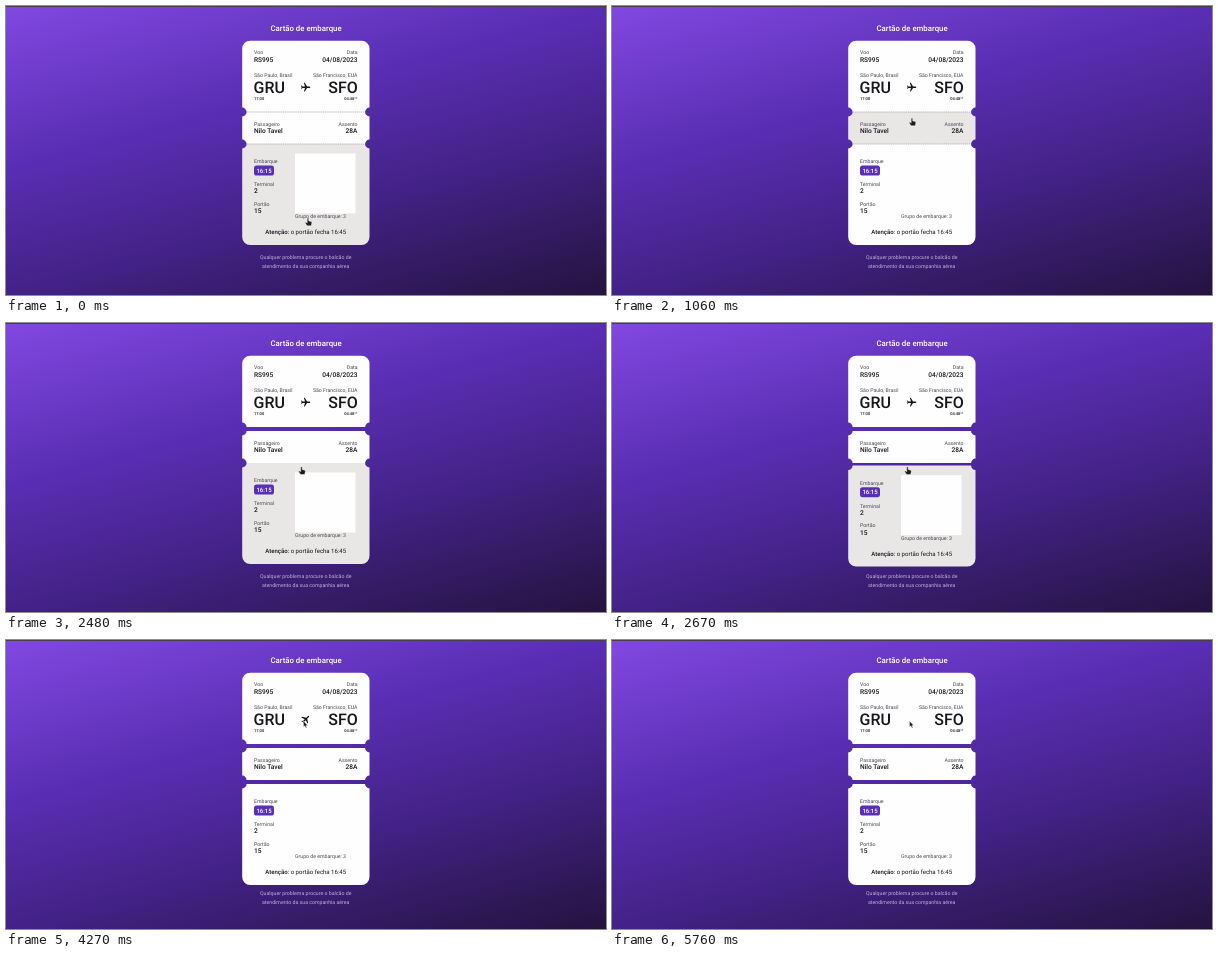
These frames come from a looping animation (600x289 px, 7000 ms). An HTML page:

```html
<!DOCTYPE html>
<html lang="pt-BR">
<head>
<meta charset="utf-8">
<title>Cartão de embarque</title>
<style>
  html, body { margin: 0; width: 100%; height: 100%; overflow: hidden; }
  svg {
    display: block; width: 100%; height: 100%;
    background: linear-gradient(165deg, #8148e0 0%, #5a2eb4 36%, #432287 64%, #25133f 100%);
    font-family: Roboto, Inter, sans-serif;
    text-rendering: geometricPrecision;
  }
  text { fill: #18161c; }
  .label { font-size: 5.2px; fill: #4b4850; }
  .value { font-size: 6.6px; font-weight: 500; }
  .code { font-size: 16px; font-weight: 500; }
  .time { font-size: 4px; font-weight: 500; }
  .strong { font-weight: 500; }
  .mid { text-anchor: middle; }
  .end { text-anchor: end; }
  .title { font-size: 7.8px; font-weight: 500; fill: #fff; }
  .note { font-size: 5.22px; fill: #c0b0dc; }
  .dash { stroke: #8d8a92; stroke-width: .6; stroke-dasharray: 1.2 .7; }
  .cursor { stroke: #fff; stroke-width: .4; fill: #1d1b20; }
</style>
</head>
<body>
<svg viewBox="0 0 600 289">
  <defs>
    <clipPath id="ticketTop"><rect x="236" y="32.5" width="128" height="72"/></clipPath>
  </defs>
  <rect width="600" height="1" fill="#45414a"/>
  <text id="title" class="title mid" x="300" y="25">Cartão de embarque</text>

  <g id="flight">
    <path class="panel"/>
    <text class="label" x="248" y="48.3">Voo</text>
    <text class="value" x="248" y="55.8">RS995</text>
    <text class="label end" x="351.5" y="48.3">Data</text>
    <text class="value end" x="351.5" y="55.8">04/08/2023</text>
    <text class="label" x="248" y="70.9">São Paulo, Brasil</text>
    <text class="label end" x="351.5" y="70.9">São Francisco, EUA</text>
    <text class="code" x="247.5" y="87.1">GRU</text>
    <text class="code end" x="351.8" y="86.7">SFO</text>
    <text class="time" x="248" y="94.4">17:00</text>
    <text class="time end" x="351.5" y="94.4">04:48<tspan dy="-1.3" font-size="2.8">+1</tspan></text>
  </g>

  <g id="seat">
    <path class="panel"/>
    <text class="label" x="248" y="120">Passageiro</text>
    <text class="value" x="248" y="127.3">Nilo Tavel</text>
    <text class="label end" x="351.5" y="120">Assento</text>
    <text class="value end" x="351.5" y="127.3">28A</text>
  </g>

  <g id="boarding">
    <path class="panel"/>
    <rect x="289" y="147.5" width="60.5" height="60" fill="#fefefe"/>
    <text class="label" x="248" y="157">Embarque</text>
    <rect x="248" y="159.6" width="20" height="10" rx="2.6" fill="#5a2fb8"/>
    <text class="strong mid" x="258" y="166.8" font-size="6" style="fill:#fff">16:15</text>
    <text class="label" x="248" y="180.3">Terminal</text>
    <text class="value" x="248" y="187.4">2</text>
    <text class="label" x="248" y="199.8">Portão</text>
    <text class="value" x="248" y="207">15</text>
    <text class="label" x="289" y="212.2">Grupo de embarque: 3</text>
    <text class="mid" x="299.7" y="228.2" font-size="6"><tspan class="strong">Atenção:</tspan> o portão fecha 16:45</text>
  </g>

  <path id="seatDash" class="dash" d="M240.8 106H359"/>
  <path id="boardingDash" class="dash" d="M240.8 138H359"/>

  <g clip-path="url(#ticketTop)">
    <path id="plane" fill="#18161c" d="M21 16v-2l-8-5V3.5c0-.8-.7-1.5-1.5-1.5S10 2.7 10 3.5V9l-8 5v2l8-2.5V19l-2 1.5V22l3.500-1 3.500 1v-1.500L13 19v-5.500z"/>
  </g>

  <g id="note">
    <text class="note mid" x="299.7" y="252.7">Qualquer problema procure o balcão de</text>
    <text class="note mid" x="299.7" y="261.6">atendimento da sua companhia aérea</text>
  </g>

  <path id="hand" class="cursor" d="M-.8 0Q0-1 .7 0V2.400L3.200 3Q4 3.300 3.800 4.400L3.200 7.300H-.9L-2.800 4.600Q-3 3.600-2 3.800L-.8 4.600Z"/>
  <path id="arrow" class="cursor" d="M0 0V6L1.400 4.800 2.400 7.100 3.400 6.700 2.400 4.400H4.200Z"/>
</svg>
<script>
  const LOOP = 7000;
  const DETACH_SEAT = 1300, DETACH_BOARDING = 2480, SLIDE = 500;
  const TAKEOFF = 4270, FLIGHT = 1500, REACH = 53.2, GONE = 5760;
  const GAP = 4;
  const WHITE = '#fefefe', HOVER = '#e8e7e6';
  const PLANE = { x: 299.7, y: 81.2, radius: 5 };

  // Tip of the pointer: time, x, y
  const pointerPath = [
    [0, 302, 212.5], [660, 300, 107.5], [1060, 300, 112.5],
    [1500, 300, 112.5], [1940, 295.5, 144.2], [2790, 295.5, 144.2], [3300, 297.5, 81]
  ];

  const el = id => document.getElementById(id);
  const clamp = v => Math.min(1, Math.max(0, v));
  const smooth = p => p * p * (3 - 2 * p);
  const mix = (a, b, p) => a + (b - a) * p;
  const move = (id, x, y, extra = '') =>
    el(id).setAttribute('transform', `translate(${x} ${y})${extra}`);
  const show = (id, on) => el(id).setAttribute('visibility', on ? 'visible' : 'hidden');

  // CSS "ease": cubic-bezier(.25, .1, .25, 1)
  function ease(p) {
    let lo = 0, hi = 1;
    for (let i = 0; i < 20; i++) {
      const s = (lo + hi) / 2, r = 1 - s;
      if (.75 * r * s + s * s * s < p) lo = s; else hi = s;
    }
    const s = (lo + hi) / 2, r = 1 - s;
    return .3 * r * r * s + 3 * r * s * s + s * s * s;
  }

  const slideFrom = (start, t) => ease(clamp((t - start) / SLIDE));

  function pointerAt(t) {
    const next = pointerPath.findIndex(k => k[0] > t);
    if (next < 0) return pointerPath[pointerPath.length - 1].slice(1);
    const [t0, x0, y0] = pointerPath[next - 1], [t1, x1, y1] = pointerPath[next];
    const p = smooth((t - t0) / (t1 - t0));
    return [mix(x0, x1, p), mix(y0, y1, p)];
  }

  // Corners are rounded outwards or, as notches, cut inwards
  function panelPath(top, bottom, roundTop, roundBottom) {
    const left = 236.2, right = 363.5;
    const [a, sa] = roundTop ? [8, 1] : [4.4, 0];
    const [b, sb] = roundBottom ? [8, 1] : [4.4, 0];
    const arc = (r, s, x, y) => `A${r} ${r} 0 0 ${s} ${x} ${y}`;
    return `M${left} ${top + a}` + arc(a, sa, left + a, top) +
      `H${right - a}` + arc(a, sa, right, top + a) +
      `V${bottom - b}` + arc(b, sb, right - b, bottom) +
      `H${left + b}` + arc(b, sb, left, bottom - b) + 'Z';
  }

  const panel = id => el(id).querySelector('.panel');
  const fill = (id, hovered) => panel(id).setAttribute('fill', hovered ? HOVER : WHITE);

  panel('flight').setAttribute('d', panelPath(34.7, 106, true, false));
  panel('seat').setAttribute('d', panelPath(106, 138, false, false));
  panel('boarding').setAttribute('d', panelPath(138, 239, false, true));
  fill('flight', false);

  function draw(t) {
    const seatFree = t >= DETACH_SEAT, boardingFree = t >= DETACH_BOARDING;
    const spread = seatFree ? GAP / 2 : 0;
    const seatY = seatFree ? spread - GAP * (1 - slideFrom(DETACH_SEAT, t)) : 0;
    const boardingY = spread + GAP * slideFrom(DETACH_BOARDING, t);

    move('title', 0, -spread);
    move('flight', 0, -spread);
    move('seat', 0, seatY);
    move('boarding', 0, boardingY);
    move('note', 0, spread);
    move('boardingDash', 0, spread);
    show('seatDash', !seatFree);
    show('boardingDash', !boardingFree && (!seatFree || t > DETACH_SEAT + SLIDE));

    const [x, y] = pointerAt(t);
    const overBoarding = y >= 138 + boardingY;
    const overSeat = !boardingFree && !overBoarding && y >= 106 + seatY;
    fill('boarding', overBoarding);
    fill('seat', overSeat);
    const hand = overBoarding || overSeat;
    show('hand', hand);
    show('arrow', !hand);
    move(hand ? 'hand' : 'arrow', x, y);

    // The plane lifts its nose under the pointer, then takes off
    const planeY = PLANE.y - spread;
    const noseUp = Math.hypot(x - PLANE.x, y - planeY) < PLANE.radius;
    const way = REACH * Math.max(0, t - TAKEOFF) / FLIGHT;
    show('plane', t < GONE);
    move('plane', PLANE.x + way, planeY - way,
      ` rotate(${noseUp ? 45 : 90}) scale(.46) translate(-11.5 -12)`);
  }

  const start = performance.now();
  function tick() {
    draw((performance.now() - start) % LOOP);
    requestAnimationFrame(tick);
  }
  tick();
</script>
</body>
</html>
```
